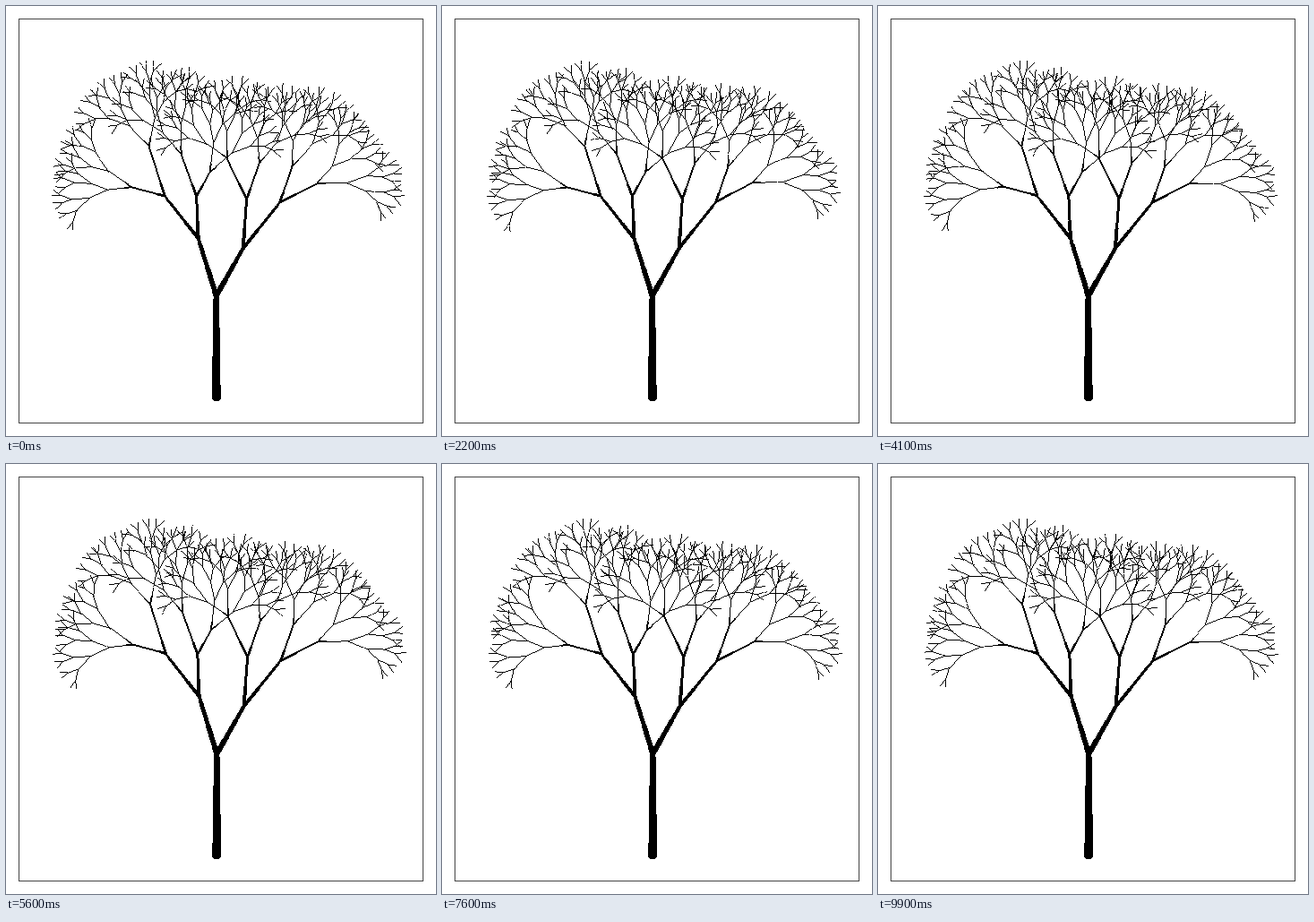
An HTML page with a canvas that plays this animation: 480 px wide and 480 px high, repeating every 10 s.

```html
<!DOCTYPE html>
<html>
<head>
<meta charset="utf-8">
<style>
html, body { margin: 0; width: 100%; height: 100%; overflow: hidden; background: #fff; }
canvas { display: block; }
</style>
</head>
<body>
<canvas id="stage" width="480" height="480"></canvas>
<script>
const ctx = document.getElementById('stage').getContext('2d');
const LOOP = 10000, STEP = 100, LEVELS = 9, TAU = 2 * Math.PI;

// Ends of the main limbs; limb i grows from limb i >> 1.
const limbs = [
  [235,438], [235,323],
  [215,259], [265,270],
  [178,212], [213,212], [269,215], [306,219],
  [140,202], [160,156], [196,165], [228,185], [247,170], [283,175], [320,179], [347,198]
];

let seed = 29;
const random = (lo, hi) => {
  seed = (seed * 16807) % 2147483647;
  return lo + (hi - lo) * seed / 2147483647;
};

const widthAt = level => Math.max(1, 10 * .64 ** level);

const nodes = [{ x: limbs[0][0], y: limbs[0][1], turn: 0 }];
for (let i = 1; i < 2 ** LEVELS; i++) {
  const level = Math.floor(Math.log2(i));
  let angle, length;
  if (i < limbs.length) {
    const dx = limbs[i][0] - limbs[i >> 1][0];
    const dy = limbs[i][1] - limbs[i >> 1][1];
    angle = Math.atan2(dx, -dy);
    length = Math.hypot(dx, dy);
  } else {
    angle = nodes[i >> 1].angle + (i % 2 ? 1 : -1) * random(.28, .52);
    length = 30 * .76 ** (level - 4) * random(.85, 1.15);
  }
  nodes.push({ level, angle, length, rate: Math.round(random(2, 8)), phase: random(0, TAU) });
}

// Hard-edged tapered line, one span per pixel along its longer axis.
function line(a, b, w0, w1) {
  const dx = b.x - a.x, dy = b.y - a.y;
  const steep = Math.abs(dy) > Math.abs(dx);
  const n = Math.max(1, Math.round(Math.max(Math.abs(dx), Math.abs(dy))));
  const slant = Math.hypot(dx, dy) / n;
  for (let s = 0; s <= n; s++) {
    const u = s / n, w = w0 + (w1 - w0) * u;
    const span = w < 1.5 ? 1 : Math.round(w * slant);
    const x = a.x + dx * u, y = a.y + dy * u;
    if (steep) ctx.fillRect(Math.round(x - span / 2), Math.round(y), span, 1);
    else ctx.fillRect(Math.round(x), Math.round(y - span / 2), 1, span);
  }
}

function draw(t) {
  ctx.fillStyle = '#fff';
  ctx.fillRect(0, 0, 480, 480);
  ctx.strokeStyle = '#444';
  ctx.strokeRect(14.5, 14.5, 451, 451);
  ctx.fillStyle = '#000';
  ctx.fillRect(231, 439, 8, 1);
  ctx.fillRect(232, 440, 6, 1);
  const lean = .003 * Math.cos(TAU * (t - 5600) / 2150);
  for (let i = 1; i < nodes.length; i++) {
    const node = nodes[i], from = nodes[i >> 1];
    const flutter = Math.sin(TAU * node.rate * t / LOOP + node.phase);
    node.turn = from.turn + .001 * node.level ** 1.5 * flutter;
    const angle = node.angle + node.turn + lean;
    node.x = from.x + node.length * Math.sin(angle);
    node.y = from.y - node.length * Math.cos(angle);
    line(from, node, widthAt(node.level), widthAt(node.level + 1));
  }
}

let shown = -1;
function tick() {
  const t = Math.floor(performance.now() % LOOP / STEP) * STEP;
  if (t !== shown) draw(shown = t);
  requestAnimationFrame(tick);
}
tick();
</script>
</body>
</html>
```
